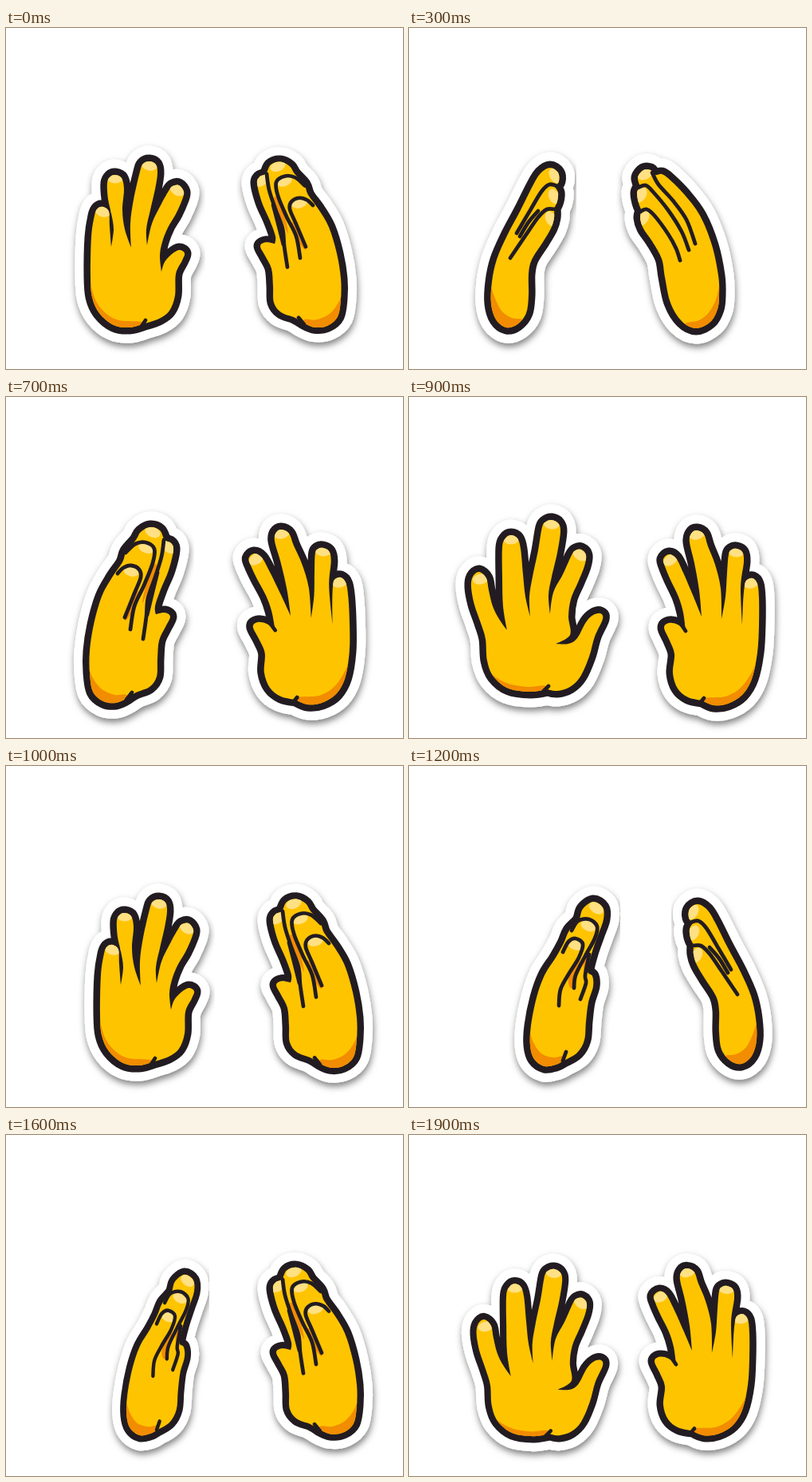
Recreate the animation shown at these times as an HTML page. Size 498 by 427 pixels, loop 2 s.

```html
<!DOCTYPE html>
<html lang="en">
<head>
<meta charset="utf-8">
<title>Waving hands</title>
<style>
  html, body { margin: 0; width: 100%; height: 100%; overflow: hidden; background: #fff; }
  svg { display: block; width: 498px; height: 427px; }
  path { stroke-linejoin: round; stroke-linecap: round; }
  .rim { fill: #fff; stroke: #fff; stroke-width: 39px; }
  .ink { fill: #231f20; stroke: #231f20; stroke-width: 17px; }
  .skin { fill: #ffc402; }
  .shade { fill: #f28c00; }
  .tips { fill: #ffe083; }
  .lines { fill: none; stroke: #231f20; stroke-width: 4.8px; }
</style>
</head>
<body>
<svg id="stage" viewBox="0 0 498 427" xmlns="http://www.w3.org/2000/svg">
  <defs>
    <filter id="shadow" x="-20%" y="-20%" width="140%" height="140%">
      <feDropShadow dx="1" dy="4.5" stdDeviation="4.5" flood-color="#000" flood-opacity=".5"/>
    </filter>
  </defs>
</svg>
<script>
const STEP = 100, STEPS = 20;
const NS = 'http://www.w3.org/2000/svg';

// Outlines are smooth curves through points; "!" marks a sharp corner.
// Tips are x,y,angle. Several curves in one string are split by "/".
const poses = {
  wide: {
    edge: `78,238 80,225 88,219 97,227 100,242 105,262 113,278 123,292! 118,262 117,225 117,188 121,177 128,173 136,177
      140,190 143,222 146,250 152,275! 151,250 155,225 162,192 167,163 172,156 179,154 187,158 190,168 186,195 179,225
      175,248 177,272! 181,245 193,222 204,198 209,192 216,191 222,198 220,212 212,232 203,253 200,275 202,298 184,309!
      200,309 211,302 222,282 231,273 240,271 243,278 233,300 226,325 215,350 202,363 186,368 174,366! 152,369 125,365
      106,350 98,330 96,303 90,283 82,260`,
    lines: '175,362 168,369',
    shade: '92,326 102,345 122,358 148,363 172,362 172,376 120,378 92,352',
    tips: '90,228,-10 128,178,0 179,159,5 215,198,30'
  },
  narrow: {
    edge: `106,310 107,262 111,235 115,226 122,224 129,230 130,248 132,274! 135,252 132,232 128,214 127,194 131,186 137,184
      145,188 148,202 146,228 149,252 157,275! 156,245 160,215 168,180 172,170 180,167 188,171 190,182 187,202 181,228
      176,252 177,272! 183,245 194,222 204,204 209,198 217,197 223,205 221,215 213,233 203,250 196,268 193,285 195,305!
      199,293 207,284 217,278 224,282 221,291 213,308 212,335 205,354 192,364 174,370! 155,375 135,372 117,357 108,337`,
    lines: '175,366 169,375',
    shade: '102,310 112,340 125,357 142,366 172,369 168,384 125,382 100,350',
    tips: '122,230,10 137,188,0 180,172,10 215,203,30'
  },
  curled: {
    edge: `105,345 105,318 110,285 120,250 133,226 146,207 151,193 163,179 169,169 181,163 193,167 199,179 207,183 210,192
      204,217 194,241 187,262 188,272! 199,270 206,275 200,288 192,305 190,328 189,350 180,363 163,370 152,377!
      138,383 122,381 109,369`,
    lines: `140,221 147,214 157,211 167,216 169,226 161,246 149,276/150,195 162,184 175,182 186,190 184,208 173,236 161,262 156,291/
      198,179 195,200 187,226 178,252 176,275 172,303/190,220 184,244 177,273/158,370 151,379`,
    shade: `100,325 107,348 119,365 136,373 151,373 150,388 115,390 98,362/
      164,244 168,248 158,270 149,280 154,261/186,210 189,217 178,243 171,258 176,234`,
    tips: '157,218,15 176,189,20 184,169,25 204,188,40'
  },
  thin: {
    edge: `152,350 153,325 160,290 170,262 184,240 194,222 201,206 213,193 218,179 231,170 243,177 244,192 237,212 229,235
      224,257 230,263 231,276 225,296 222,320 220,343 211,359 194,369! 184,374 170,376 157,367`,
    lines: `193,233 200,220 209,216 218,223 213,240 200,261 190,280 188,300/204,206 212,194 226,192 236,201 233,216 221,238
      209,262 207,278/226,236 221,262 222,272 215,292/197,358 193,369`,
    shade: `148,325 156,346 166,360 181,365 195,364 188,382 160,382 146,362/
      214,240 211,262 205,278 200,272 203,256/224,233 224,252 220,262 219,246`,
    tips: '209,224,20 225,200,25 235,178,35'
  },
  side: {
    edge: `103,345 104,318 110,290 123,260 140,228 155,198 165,182 177,175 187,181 188,192 183,199! 187,206 186,217 182,226!
      182,238 178,251 168,268 154,290 150,308 150,335 147,357 136,371 122,375 109,365`,
    lines: '186,198 176,196 166,205 151,230 135,257/183,227 173,227 162,237 146,260 127,288/162,229 150,243 139,261',
    shade: '98,312 107,336 116,354 129,363 144,366 138,382 105,382 95,350',
    tips: '183,185,60 182,211,65 178,239,65'
  },
  back: {
    edge: `389,335 388,310 380,272 365,235 345,208 326,189 317,183 309,184 303,178 294,178 287,187 290,198! 286,206 288,219
      292,229! 290,238 294,251 305,267 317,289 321,312 328,344 342,367 360,376 378,368 387,352`,
    lines: `305,181 313,196 331,216 348,240 359,270/287,200 297,197 306,205 325,228 342,255 351,278/
      290,230 298,227 308,235 325,258 335,276 340,291`,
    shade: '392,312 386,337 377,355 364,366 345,371 355,386 388,382 396,350',
    tips: '296,183,-25 291,209,-60 294,238,-60'
  },
  turned: {
    edge: `321,212 319,203 326,197 335,202 344,220 356,248 367,275! 364,242 358,208 352,182 354,171 361,167 370,172 375,187
      384,210 391,240 392,278! 397,250 399,220 401,197 405,191 411,190 418,194 420,206 416,238 418,285! 419,258 421,236
      424,229 431,227 437,234 439,252 439,285 437,320 430,353 418,373 400,384 382,386 368,380! 350,376 337,365 331,346
      333,322 327,305 320,289 326,283 337,285 347,293! 344,270 338,250 328,229`,
    lines: '370,377 366,382/341,284 347,293',
    shade: '442,315 432,341 417,363 397,375 368,378 370,396 415,398 444,356',
    tips: '328,204,-35 361,172,-15 411,194,0 429,233,-10'
  }
};

// Each step: pose, shift x, shift y, scale x, scale y, slant.
const left = [
  ['narrow', 0], ['curled', 0], ['thin', -46], ['side', 0], ['side', -8],
  ['side', -10], ['thin', -48], ['curled', 0], ['narrow', -8], ['wide', 0],
  ['narrow', 12], ['curled', 34], ['thin', 0], ['side', 48], ['side', 51],
  ['side', 49], ['thin', 11.4, 8.7, .92, .977], ['curled', 30], ['narrow', 5], ['wide', 9.8, 17.8, .96, .974]
];
const right = [
  ['curled', 525, 14, -1, .942], ['thin', 555, 0, -1], ['back', 6], ['back', 0], ['back', -4],
  ['thin', 546, 0, -1], ['curled', 521, 8, -1, .97], ['turned', -31, -1, 1.02, 1, .05], ['wide', 544, 4, -1], ['turned', 0],
  ['curled', 545, 10, -1, .96], ['thin', 588, 0, -1], ['side', 539, -2, -1], ['side', 542, 0, -1], ['side', 543, 0, -1],
  ['thin', 592, 0, -1], ['curled', 545, 11, -1, .949], ['turned', -8, 5, 1, .97], ['wide', 539, 8, -1], ['turned', -12, 7.5, 1, .955]
];

function curve(text, closed) {
  const pts = text.trim().split(/\s+/).map(s => {
    const [x, y] = s.split(',').map(parseFloat);
    return { x, y, sharp: s.endsWith('!') };
  });
  const n = pts.length;
  const at = i => closed ? pts[(i + n) % n] : pts[Math.max(0, Math.min(n - 1, i))];
  const handle = (i, sign) => {
    const p = at(i), a = at(i - 1), b = at(i + 1), k = p.sharp ? 0 : sign / 6;
    return `${p.x + (b.x - a.x) * k} ${p.y + (b.y - a.y) * k}`;
  };
  let d = `M${pts[0].x} ${pts[0].y}`;
  for (let i = 0; i < (closed ? n : n - 1); i++) {
    const p = at(i + 1);
    d += `C${handle(i, 1)} ${handle(i + 1, -1)} ${p.x} ${p.y}`;
  }
  return closed ? d + 'Z' : d;
}

const curves = (text, closed) => text.split('/').map(s => curve(s, closed)).join('');

function oval(text) {
  const [x, y, deg] = text.split(',').map(Number);
  const a = deg * Math.PI / 180, dx = 10 * Math.cos(a), dy = 10 * Math.sin(a);
  const arc = `A10 6.5 ${deg} 0 1 `;
  return `M${x - dx} ${y - dy}${arc}${x + dx} ${y + dy}${arc}${x - dx} ${y - dy}Z`;
}

for (const name in poses) {
  const p = poses[name], edge = curve(p.edge, true);
  poses[name] = {
    rim: edge, ink: edge, skin: edge, clip: edge,
    shade: curves(p.shade, true),
    tips: p.tips.split(' ').map(oval).join(''),
    lines: curves(p.lines, false)
  };
}

function add(parent, tag, attrs = {}) {
  const el = document.createElementNS(NS, tag);
  for (const key in attrs) el.setAttribute(key, attrs[key]);
  return parent.appendChild(el);
}

function makeHand(id) {
  const outer = add(document.getElementById('stage'), 'g', { filter: 'url(#shadow)' });
  const body = add(outer, 'g');
  const parts = { clip: add(add(body, 'clipPath', { id }), 'path') };
  for (const name of ['rim', 'ink', 'skin']) parts[name] = add(body, 'path', { class: name });
  const inside = add(body, 'g', { 'clip-path': `url(#${id})` });
  for (const name of ['shade', 'tips']) parts[name] = add(inside, 'path', { class: name });
  parts.lines = add(body, 'path', { class: 'lines' });
  return ([pose, x, y = 0, sx = 1, sy = 1, slant = 0]) => {
    body.setAttribute('transform', `matrix(${sx} 0 ${slant} ${sy} ${x} ${y})`);
    for (const name in parts) parts[name].setAttribute('d', poses[pose][name]);
  };
}

const drawLeft = makeHand('leftClip'), drawRight = makeHand('rightClip');
let shown = -1;

function render(time) {
  const step = Math.floor(time / STEP) % STEPS;
  if (step === shown) return;
  shown = step;
  drawLeft(left[step]);
  drawRight(right[step]);
}

const start = performance.now();
function tick() {
  render(performance.now() - start);
  requestAnimationFrame(tick);
}
tick();
</script>
</body>
</html>
```
